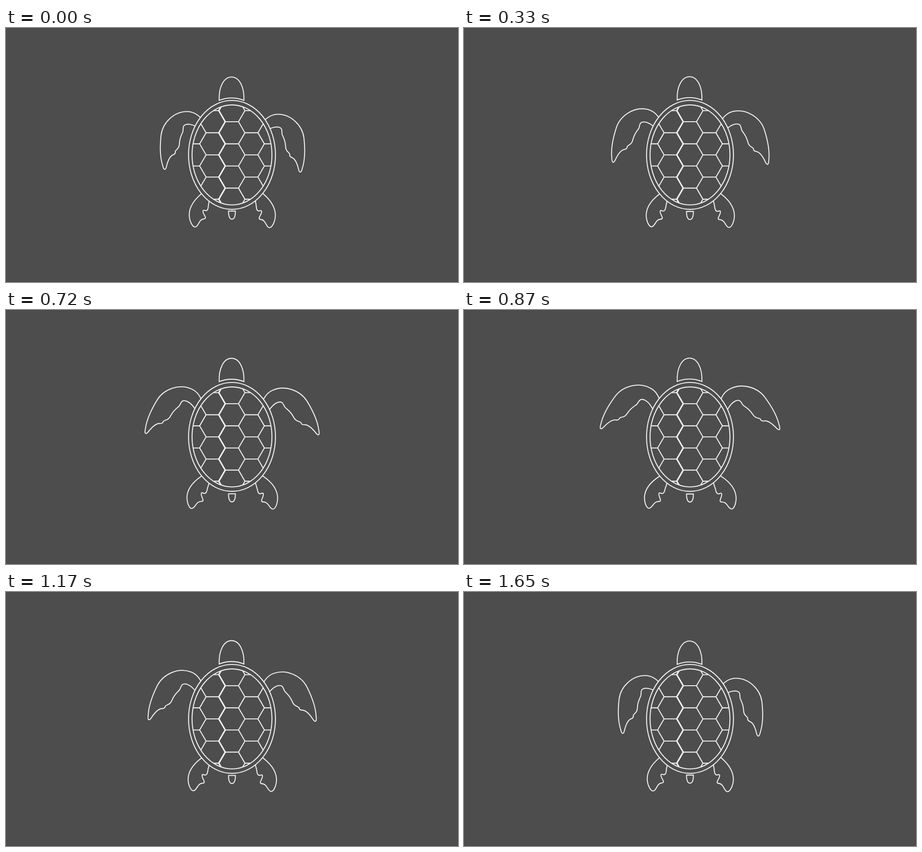
Recreate the animation shown at these times as an HTML page with a canvas. Size 998 px wide and 561 px high, loop 1.8 s.

```html
<!DOCTYPE html>
<html lang="en">
<head>
<meta charset="utf-8">
<title>Swimming turtle</title>
<style>
html, body { margin: 0; width: 100%; height: 100%; overflow: hidden; background: #4d4d4d; }
canvas { display: block; }
</style>
</head>
<body>
<canvas id="stage" width="998" height="561"></canvas>
<script>
const ctx = document.getElementById('stage').getContext('2d');
const BG = '#4d4d4d', INK = '#f2f2f2';
const LOOP = 1800, STEP = 30, PEAK = 900;
const CX = 499, CY = 280.3;
const COL = 42.9, ROW = 24.45; // honeycomb spacing

// Left limbs at rest; the right ones are mirrored
const flipper = new Path2D(`M434 203 C424 191 413 184.5 400 184.5
  C370 184.5 346 210 342.5 236 C339.5 262 340.5 287 346 304
  C348.5 315 352 314 354 307 C357 294 361 284 368 280.5
  Q375 278 373.7 273 C374.5 268 383 268 383 254
  C384 240 388 236 390.5 229 C392 222 388 213 402 212.5 Q412 212.5 424 220`);
const leg = new Path2D(`M438 361 C418 376 404.5 394 404.5 413
  C405 427 412 440 418 439.5 C426 438 425 422 438 421.5
  C444 420 437 413 435.5 408 C433 400 438 403 441 403.5
  C448 403 446 392 447.5 388 Q449 382 449 377`);
const head = new Path2D(`M470.7 159.7 C469.5 130 481 108.2 498 108.2
  C515 108.2 526.5 130 525.3 159.7 Q498 149.2 470.7 159.7 Z`);
const tail = new Path2D(`M491.4 404.4 H506.4 C506.8 415 504 422.3 498.9 422.3
  C493.8 422.3 491 415 491.4 404.4 Z`);

const mix = (a, b, k) => a + (b - a) * k;

// Steady rise to the peak, then a steady return that finishes at end
function swing(t, end) {
  return t <= PEAK ? t / PEAK : Math.max(0, 1 - (t - PEAK) / (end - PEAK));
}

function turn(x, y, degrees, scale) {
  return new DOMMatrix().translate(x, y).rotate(degrees).scale(scale).translate(-x, -y);
}

function stroke(shape, matrix) {
  const path = new Path2D();
  path.addPath(shape, matrix);
  ctx.stroke(path);
}

function pair(shape, matrix, mirror) {
  stroke(shape, matrix);
  stroke(shape, new DOMMatrix(mirror).multiply(matrix));
}

function oval(rx, ry) {
  ctx.beginPath();
  ctx.ellipse(CX, CY, rx, ry, 0, 0, 2 * Math.PI);
}

function zigzag(x, lean) {
  ctx.beginPath();
  for (let i = -5; i <= 5; i++) ctx.lineTo(x + (i % 2 ? -lean : lean), CY + i * ROW);
  ctx.stroke();
}

function rungs(x, shift) {
  ctx.beginPath();
  for (let i = -4 - shift; i <= 5; i += 2) {
    ctx.moveTo(x - 14.3, CY + i * ROW);
    ctx.lineTo(x + 14.3, CY + i * ROW);
  }
  ctx.stroke();
}

function shell() {
  oval(96, 120.3);
  ctx.fill();
  ctx.stroke();

  ctx.save();
  oval(88.2, 110.4);
  ctx.stroke();
  ctx.clip();
  for (let c = -2; c <= 2; c++) rungs(CX + c * COL, c % 2 ? 0 : 1);
  for (let c = -2; c <= 1; c++) zigzag(CX + (c + 0.5) * COL, c % 2 ? -7.1 : 7.1);
  zigzag(CX - COL / 2 - 1.2, -7.1); // doubled seam
  ctx.restore();
}

function draw(t) {
  const front = swing(t, 1650), back = swing(t, 1350);
  ctx.fillStyle = BG;
  ctx.fillRect(0, 0, 998, 561);
  ctx.strokeStyle = '#464646';
  ctx.lineWidth = 1;
  ctx.strokeRect(0.5, 0.5, 997, 560);

  ctx.strokeStyle = INK;
  ctx.lineWidth = 2.1;
  pair(flipper, turn(425, 205, 31.4 * front, 1 + 0.041 * front),
    [-1, 0, 0, 1, mix(1000.2, 998, front), mix(6, 2, front)]);
  pair(leg, turn(428, 374, 8.6 * back, 1 + 0.01 * back),
    [-1, 0, 0, 1.02, 999.3, -7.3]);
  stroke(head, new DOMMatrix().translate(0, -2 * back));
  stroke(tail, new DOMMatrix().translate(0, 2 * back));
  shell();
}

const start = performance.now();
function tick() {
  const t = (performance.now() - start) % LOOP;
  draw(Math.floor(t / STEP) * STEP);
  requestAnimationFrame(tick);
}
tick();
</script>
</body>
</html>
```
